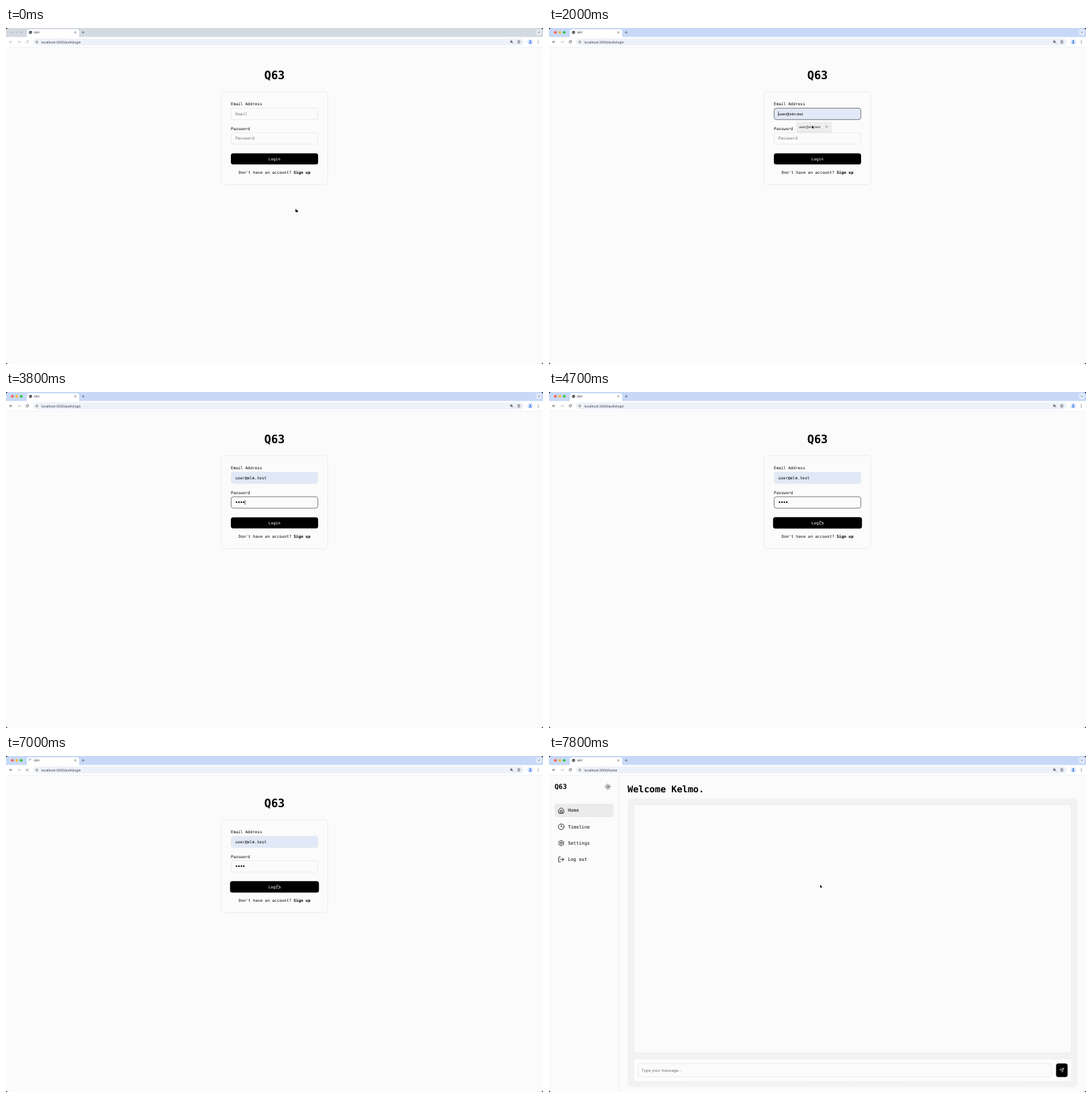
An HTML page with a canvas that plays this animation: 800 px wide and 500 px high, repeating every 8 s.

```html
<!DOCTYPE html>
<html lang="en">
<head>
<meta charset="utf-8">
<title>Login</title>
<style>
html, body { margin: 0; width: 100%; height: 100%; overflow: hidden; background: #fbfbfb; }
canvas { display: block; width: 800px; height: 500px; }
</style>
</head>
<body>
<canvas id="stage"></canvas>
<script>
const LOOP = 8000, STEP = 100;
const APP = 'Q63', MAIL = 'user@elm.test', USER = 'Kelmo';
const MONO = '"DejaVu Sans Mono", monospace';
const UI = 'Inter, sans-serif';
const SANS = '"Liberation Sans", sans-serif';
const PAGE = '#fbfbfb', LINE = '#e6e6e6', INK = '#0a0a0a';

const canvas = document.getElementById('stage');
const ratio = window.devicePixelRatio || 1;
canvas.width = 800 * ratio;
canvas.height = 500 * ratio;
const c = canvas.getContext('2d');
c.scale(ratio, ratio);
c.textRendering = 'geometricPrecision';

const clamp = x => Math.max(0, Math.min(1, x));
const ease = x => { x = clamp(x); return x * x * (3 - 2 * x); };
const ramp = (t, from, to) => ease((t - from) / (to - from));
const between = (t, a, b) => t >= a && t < b;
const mix = (a, b, k) => a + (b - a) * k;

function box(x, y, w, h, r, fill, stroke, width = 0.8) {
  c.beginPath();
  c.roundRect(x, y, w, h, r);
  if (fill) { c.fillStyle = fill; c.fill(); }
  if (stroke) { c.strokeStyle = stroke; c.lineWidth = width; c.stroke(); }
}

function text(str, x, y, size, { font = MONO, color = INK, weight = 400, align = 'left' } = {}) {
  c.font = `${weight} ${size}px ${font}`;
  c.fillStyle = color;
  c.textAlign = align;
  c.fillText(str, x, y);
}

function disc(x, y, r, fill) {
  c.beginPath();
  c.arc(x, y, r, 0, 7);
  c.fillStyle = fill;
  c.fill();
}

// Icons live on a 24-unit grid centred on (x, y).
function icon(path, x, y, size, color, width = 2, fill) {
  c.save();
  c.translate(x, y);
  c.scale(size / 24, size / 24);
  c.translate(-12, -12);
  c.lineWidth = width;
  c.lineCap = c.lineJoin = 'round';
  c.strokeStyle = color;
  const p = typeof path === 'string' ? new Path2D(path) : path;
  if (fill) { c.fillStyle = fill; c.fill(p); }
  c.stroke(p);
  c.restore();
}

function gearPath() {
  const p = new Path2D();
  for (let i = 0; i <= 96; i++) {
    const a = i * Math.PI / 48;
    const r = 8.5 + 1.5 * Math.tanh(2.2 * Math.cos(6 * (a + Math.PI / 2)));
    p.lineTo(12 + r * Math.cos(a), 12 + r * Math.sin(a));
  }
  p.closePath();
  p.moveTo(15, 12);
  p.arc(12, 12, 3, 0, 7);
  return p;
}

function sunPath() {
  const p = new Path2D();
  p.arc(12, 12, 4, 0, 7);
  for (let i = 0; i < 8; i++) {
    const a = i * Math.PI / 4, x = Math.cos(a), y = Math.sin(a);
    p.moveTo(12 + 8 * x, 12 + 8 * y);
    p.lineTo(12 + 10 * x, 12 + 10 * y);
  }
  return p;
}

const ICON = {
  back: 'M20 12H4M11 5L4 12L11 19',
  forward: 'M4 12H20M13 5L20 12L13 19',
  reload: 'M20 12A8 8 0 1 1 17.5 6.2L20 8.5M20 3.5V8.5H15',
  cross: 'M5 5L19 19M19 5L5 19',
  plus: 'M12 4V20M4 12H20',
  chevron: 'M6 9L12 15L18 9',
  zoom: 'M16 10A6 6 0 1 1 4 10A6 6 0 1 1 16 10M14.5 14.5L21 21M10 7.5V12.5M7.5 10H12.5',
  star: 'M12 3L14.8 9.2L21.5 9.9L16.5 14.4L17.9 21L12 17.6L6.1 21L7.5 14.4L2.5 9.9L9.2 9.2Z',
  home: 'M3 10L12 2.5L21 10V20A2 2 0 0 1 19 22H5A2 2 0 0 1 3 20ZM9 22V12H15V22',
  clock: 'M22 12A10 10 0 1 1 2 12A10 10 0 1 1 22 12M12 6V12L16 14',
  logout: 'M9 21H5A2 2 0 0 1 3 19V5A2 2 0 0 1 5 3H9M16 17L21 12L16 7M21 12H9',
  send: 'M22 2L15 22L11 13L2 9ZM22 2L11 13',
  sun: sunPath(),
  gear: gearPath()
};

function favicon(t, loading) {
  if (loading) {
    const a = Math.PI * 0.95 + (t - 7000) / 1000 * 4;
    c.beginPath();
    c.arc(36.5, 6.6, 2.2, a, a + 2.3);
    c.strokeStyle = '#4d6fae';
    c.lineWidth = 0.8;
    c.stroke();
    return;
  }
  disc(36.5, 6.6, 2.4, '#3c4043');
  c.fillStyle = '#dfe3e8';
  c.beginPath();
  c.ellipse(35.5, 6.3, 0.9, 0.5, 0.5, 0, 7);
  c.ellipse(37.4, 7.6, 0.8, 0.45, -0.6, 0, 7);
  c.fill();
}

function browser(t, atHome) {
  const active = t >= 800, loading = between(t, 6100, 7300);
  const strip = active ? '#c7d9f7' : '#d4dae1';
  const dark = '#3c4043', pale = '#a9adb2';
  c.fillStyle = strip;
  c.fillRect(0, 0, 800, 14);
  c.fillStyle = '#fff';
  c.fillRect(0, 13.4, 800, 14.8);
  c.fillStyle = '#e3e6ea';
  c.fillRect(0, 28, 800, 0.5);

  ['#f9605a', '#f8bd32', '#30c544'].forEach((col, i) =>
    disc(9.5 + i * 6.6, 6.5, 2.1, active ? col : '#c5cad0'));

  box(31, 2, 78, 14, 3.5, '#fff');
  favicon(t, loading);
  text(APP, 41.5, 8.1, 4.2, { font: UI, color: '#24272b' });
  icon(ICON.cross, 103.2, 6.5, 4, '#303336', 3.2);
  icon(ICON.plus, 115, 6.5, 5, '#45484c', 2.8);
  box(789.6, 2.2, 8.4, 8.4, 2.8, active ? '#e3ecfb' : '#e7ebef');
  icon(ICON.chevron, 793.8, 6.5, 5, '#303336', 3);

  const nav = active ? dark : pale;
  icon(ICON.back, 7.3, 20.7, 5.6, nav, 2.8);
  icon(ICON.forward, 19.5, 20.7, 5.6, pale, 2.8);
  icon(loading ? ICON.cross : ICON.reload, 31.6, 20.7, 5.4, nav, 2.8);

  box(40, 15.6, 731, 10.4, 5.2, '#edf1f8');
  disc(46, 20.8, 3.4, '#fff');
  c.beginPath();
  c.arc(46, 20.8, 1.8, 0, 7);
  c.strokeStyle = dark;
  c.lineWidth = 0.6;
  c.stroke();
  c.fillStyle = dark;
  c.fillRect(45.75, 20.5, 0.5, 1.3);
  c.fillRect(45.75, 19.7, 0.5, 0.5);
  text('localhost:3000/' + (atHome ? 'home' : 'auth/login'), 52.6, 22.5, 4.85,
    { font: UI, color: '#2b2e33' });

  icon(ICON.zoom, 753.2, 20.8, 5.6, dark, 2.8);
  icon(ICON.star, 764, 20.6, 5.8, dark, 2.5);
  disc(781, 20.7, 4, '#d6e5fc');
  disc(781, 19.5, 1.15, '#2d6be0');
  c.beginPath();
  c.ellipse(781, 22.8, 2.2, 1.5, 0, Math.PI, 0);
  c.fill();
  for (let i = -1; i < 2; i++) disc(793, 20.7 + i * 1.9, 0.55, dark);
}

function field(y, focus, fill = PAGE) {
  const g = Math.round(mix(230, 88, focus));
  box(335.4, y, 129.2, 17, 3.5, fill, `rgb(${g},${g},${g})`);
}

function caret(x, y) {
  c.fillStyle = INK;
  c.fillRect(x, y - 3.6, 0.6, 7.2);
}

function emailField(t) {
  const preview = between(t, 1900, 2300), filled = t >= 2300;
  const focus = t < 800 ? 0 : ramp(t, 740, 900) * (1 - ramp(t, 2680, 2850));
  field(119.3, focus, preview || filled ? '#e1e9f8' : PAGE);
  if (filled) text(MAIL, 341.7, 129.6, 5.93, { color: '#000' });
  else if (preview) text(MAIL, 341.8, 129.5, 5.65, { font: SANS, color: '#000' });
  else text('Email', 341.7, 129.6, 5.93, { color: '#6f6f6f' });
  if (between(t, 800, 1300) || between(t, 1800, 2300)) caret(341.5, 127.7);
  if (between(t, 2300, 2700)) caret(388.2, 127.7);
}

function passwordField(t) {
  const focus = ramp(t, 2640, 2840) * (1 - ramp(t, 4700, 4900));
  const dots = [3400, 3600, 3700, 3800].filter(at => t >= at).length;
  field(155.9, focus);
  if (!dots) text('Password', 341.7, 166.2, 5.93, { color: '#6f6f6f' });
  for (let i = 0; i < dots; i++) disc(343.5 + i * 3.57, 164, 1.15, '#000');
  if (between(t, 2700, 3200) || between(t, 3400, 4400)) caret(341.5 + dots * 3.57, 164.4);
}

function suggestion(t) {
  if (!between(t, 1500, 2300)) return;
  c.save();
  c.shadowColor = 'rgba(0,0,0,.16)';
  c.shadowBlur = 2 * ratio;
  c.shadowOffsetY = 0.6 * ratio;
  box(369.3, 140.2, 51.4, 14, 1.2, t >= 1900 ? '#eeeeee' : '#fdfdfd');
  c.restore();
  text(MAIL, 372.4, 148.6, 4.9, { font: SANS, color: '#1c1c1c' });
  icon(ICON.cross, 413.5, 147, 4.6, '#333', 2.4);
}

function loginButton(t) {
  const s = 1 + 0.019 * ramp(t, 4150, 4400);
  c.save();
  c.translate(400, 194.8);
  c.scale(s, s);
  box(-65, -8.3, 130, 16.6, 3.5, '#000');
  text('Login', 0, 2.2, 5.93, { color: '#fff', align: 'center' });
  c.restore();
}

function loginPage(t) {
  text(APP, 400, 75.8, 16.95, { weight: 700, align: 'center', color: '#000' });
  box(320.6, 94.8, 158.8, 138.4, 5, PAGE, LINE);
  text('Email Address', 335.1, 115, 5.93);
  emailField(t);
  text('Password', 335.1, 151.7, 5.93);
  passwordField(t);
  loginButton(t);
  text("Don't have an account? ", 346.6, 217, 5.93);
  text('Sign up', 453.5, 217, 5.93, { weight: 700, align: 'right', color: '#000' });
  suggestion(t);
}

function homePage() {
  c.fillStyle = LINE;
  c.fillRect(104.2, 28, 0.7, 472);
  text(APP, 8.2, 49.3, 10.17, { weight: 700, color: '#000' });
  icon(ICON.sun, 87.8, 45.7, 9.6, INK);
  box(8.4, 71, 87.8, 20, 3.5, '#ebebeb');
  [['Home', ICON.home], ['Timeline', ICON.clock], ['Settings', ICON.gear], ['Log out', ICON.logout]]
    .forEach(([label, path], i) => {
      const y = 81 + i * 24.3;
      icon(path, 18.2, y, 10.17, INK);
      text(label, 28.2, y + 2.4, 6.78);
    });

  text(`Welcome ${USER}.`, 117, 54, 13.55, { weight: 700, color: '#000' });
  box(117.3, 63.6, 669.9, 429, 5.5, '#f2f2f2');
  box(126.2, 72.2, 652.4, 369.8, 3.5, PAGE, LINE);
  box(126.2, 450.8, 652.4, 33.6, 3.5, '#fdfdfd', '#ebebeb');
  box(132.6, 457.6, 616.2, 20, 3.5, PAGE, LINE);
  text('Type your message...', 137.8, 469.7, 5.93, { font: UI, color: '#6f6f6f' });
  box(755.4, 457.4, 17.2, 20.4, 3.5, '#000');
  icon(ICON.send, 764, 467.6, 6.8, '#fff', 2.2);
}

function pointerAt(t) {
  const moves = [
    [100, 650, 392.2, 127],
    [1800, 2000, 392, 145],
    [2350, 2700, 391.9, 164.5],
    [3850, 4350, 404, 191.6]
  ];
  let x = 431.5, y = 268.6;
  for (const [from, to, nx, ny] of moves) {
    const k = ramp(t, from, to);
    x = mix(x, nx, k);
    y = mix(y, ny, k);
  }
  return [x, y];
}

function shape(path, x, y, width) {
  const p = new Path2D(path);
  c.save();
  c.translate(x, y);
  c.lineJoin = c.lineCap = 'round';
  c.strokeStyle = '#fff';
  c.lineWidth = width;
  c.stroke(p);
  c.fillStyle = '#000';
  c.fill(p);
  c.restore();
}

function pointer(t, atHome) {
  if (between(t, 3400, 3850)) return;
  const [x, y] = pointerAt(t);
  const onButton = !atHome && y > 186.5;
  const onPassword = !atHome && t >= 2350 && between(y, 156, 173);
  if (onButton) {
    shape('M0 0.6Q.5 0 .9 .6V2.3L3 2.8Q3.6 3 3.5 3.7L3 5.4H.6L-1 3.4Q-.9 2.7 0 3.2Z', x, y, 0.9);
  } else if (onPassword) {
    c.save();
    c.translate(x, y);
    c.strokeStyle = '#222';
    c.lineWidth = 0.7;
    c.stroke(new Path2D('M-1.3 -2.7Q0 -2.7 0 -2Q0 -2.7 1.3 -2.7M0 -2V2M-1.3 2.7Q0 2.7 0 2Q0 2.7 1.3 2.7M-.7 .6H.7'));
    c.restore();
  } else {
    shape('M0 0V4.5L1 3.6L1.7 5.2L2.4 4.9L1.7 3.3H3.1Z', x, y, 0.7);
  }
}

function corners() {
  c.beginPath();
  c.rect(0, 0, 800, 500);
  c.roundRect(0, 0, 800, 500, 3.5);
  c.fillStyle = '#000';
  c.fill('evenodd');
}

function draw() {
  const t = Math.floor(performance.now() % LOOP / STEP) * STEP;
  const atHome = t >= 7100;
  c.fillStyle = PAGE;
  c.fillRect(0, 0, 800, 500);
  if (atHome) homePage();
  else loginPage(t);
  browser(t, atHome);
  pointer(t, atHome);
  corners();
  requestAnimationFrame(draw);
}
requestAnimationFrame(draw);
</script>
</body>
</html>
```
